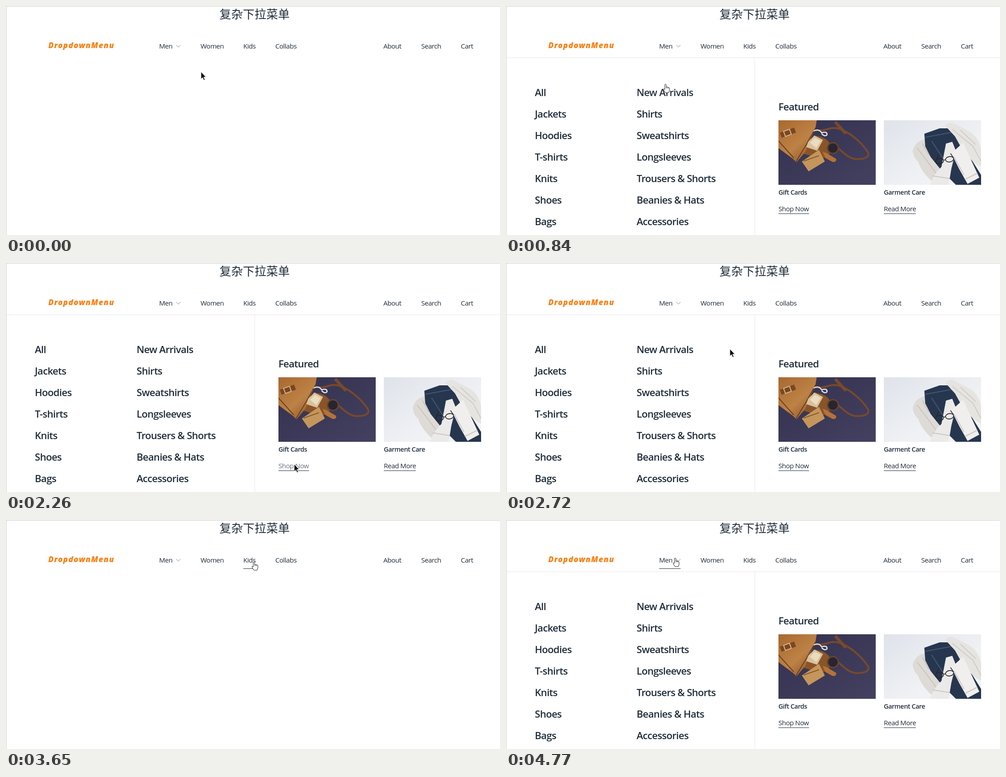
An HTML page for the animation above (4830 ms loop, 1097x511 px).

```html
<!DOCTYPE html>
<html lang="en">
<head>
<meta charset="utf-8">
<title>Dropdown menu</title>
<style>
  html, body { margin: 0; width: 100%; height: 100%; overflow: hidden; background: #fff; }
  svg { display: block; }
  text { font-family: "Open Sans", "Noto Sans", sans-serif; fill: #1f2d3a; white-space: pre; }
  .title { font: 26px "Noto Sans CJK SC", "Noto Sans CJK", sans-serif; }
  .brand { font-size: 17px; font-style: italic; font-weight: 800; letter-spacing: 1.35px; fill: #fb7f12; }
  .nav, .link { font-size: 15px; letter-spacing: -.5px; }
  .big { font-size: 22px; font-weight: 600; letter-spacing: -.7px; }
  .caption { font-size: 14.4px; font-weight: 600; letter-spacing: -.48px; }
  .rule { fill: #e5e7eb; }
  .line { fill: #1f2d3a; }
  #arrow { fill: #111; stroke: #fff; stroke-width: .8; }
  #hand { fill: #fff; stroke: #222; stroke-linejoin: round; }
</style>
</head>
<body>
<svg width="1097" height="511" viewBox="0 0 1097 511">
  <defs>
    <linearGradient id="navy" x2="1" y2="1">
      <stop stop-color="#33314f"/><stop offset="1" stop-color="#43415f"/>
    </linearGradient>
    <linearGradient id="leather" x2=".8" y2="1">
      <stop stop-color="#a8682f"/><stop offset=".6" stop-color="#bd8246"/><stop offset="1" stop-color="#8d5628"/>
    </linearGradient>
    <linearGradient id="pale" x2="1" y2="1">
      <stop stop-color="#dfe3ea"/><stop offset=".6" stop-color="#eff1f4"/><stop offset="1" stop-color="#f5f5f6"/>
    </linearGradient>
    <clipPath id="crop"><path d="M0 0H216V144H0Z"/></clipPath>
  </defs>

  <text class="title" x="474" y="28">复杂下拉菜单</text>
  <text class="brand" x="94" y="94">DropdownMenu</text>
  <g id="nav"></g>
  <path d="M378 87l4.7 5 4.7-5" fill="none" stroke="#7d858d"/>

  <g id="panel">
    <path class="rule" d="M0 115H1097v1H0ZM552 116h1v420h-1Z"/>
    <g id="list"></g>
    <text class="big" x="605" y="233">Featured</text>

    <g transform="translate(605 255)" clip-path="url(#crop)">
      <path fill="url(#navy)" d="M0 0H216V144H0Z"/>
      <g fill="none" stroke="#79492b" stroke-linecap="round">
        <path stroke-width="4" d="M84 22C104 26 112 14 132 18C160 26 186 52 198 70C206 84 186 88 168 86C150 82 140 66 124 56"/>
        <path stroke-width="7" d="M128 6L148 28"/>
      </g>
      <path fill="#8a5429" d="M78 34Q112 36 118 62Q114 84 92 86L54 74Z"/>
      <path fill="url(#leather)" d="M0 0H85L82 18L70 44L60 70L40 94L32 86L0 62Z"/>
      <path fill="none" stroke="#6b3f1f" stroke-width="2" d="M83 16L62 54L38 94M0 46L34 84"/>
      <g transform="rotate(-20 20 28)">
        <path fill="#7a4721" d="M4 22H38V34H4Z"/>
        <path fill="none" stroke="#d9b98a" stroke-width="2" d="M13 22H27V34H13Z"/>
      </g>
      <path fill="none" stroke="#e6e4e8" stroke-width="2.5" d="M78 24Q90 18 96 28Q108 24 108 32Q104 38 96 30"/>
      <path fill="#d8c19b" d="M66 48L80 34L99 44L86 68L62 60Z"/>
      <path fill="#eadcc0" d="M70 50L81 39L94 46L84 62Z"/>
      <circle cx="121" cy="62" r="12" fill="#29242f" stroke="#64452f" stroke-width="3"/>
      <path fill="#c4965c" d="M52 92L90 66L103 92L67 114Z"/>
      <path stroke="#85592f" stroke-width="2" d="M56 91L90 79"/>
      <path fill="#b57237" d="M98 70L108 74L128 86Q130 94 120 93L104 84Z"/>
    </g>

    <g transform="translate(839 255)" clip-path="url(#crop)">
      <path fill="url(#pale)" d="M0 0H216V144H0Z"/>
      <path fill="#dedbd7" d="M64 68Q70 46 92 42L106 76L128 108L152 126L134 144H116Q84 118 76 92Q66 84 64 68Z"/>
      <path fill="none" stroke="#c7c3be" stroke-width="2" d="M74 62L94 88L122 126M86 52L100 78"/>
      <path fill="#27364f" d="M90 30L124 18L154 18L168 34L190 80L216 122V144H160L128 112L104 82L92 58Z"/>
      <path fill="none" stroke="#465872" stroke-width="2" d="M92 38L156 26M106 46L136 92"/>
      <path fill="#e6e4e1" d="M136 12Q146 2 158 8L192 26Q212 40 216 66V104L200 94L178 72L158 36Z"/>
      <path fill="none" stroke="#cfccc8" stroke-width="2" d="M152 20L198 58L216 92M170 22L204 54"/>
      <path fill="#ebeae8" d="M138 52L152 48L160 68L150 108L144 144H102Q112 118 128 104Z"/>
      <path fill="#f0efed" d="M150 74L176 50L188 76L212 128L186 142L168 110Z"/>
      <path fill="none" stroke="#cac7c3" stroke-width="2" d="M180 132L208 118M108 124L146 130M156 82L178 122"/>
      <g fill="none" stroke="#26262b" stroke-width="1.6">
        <ellipse cx="124" cy="91" rx="9" ry="6" transform="rotate(-10 124 91)"/>
        <ellipse cx="146" cy="87" rx="9" ry="6" transform="rotate(-10 146 87)"/>
        <path d="M133 89L137 88M115 91L122 76M155 84L148 74"/>
      </g>
    </g>

    <text class="caption" x="605" y="421">Gift Cards</text>
    <text class="caption" x="839" y="421">Garment Care</text>
    <text class="link" id="shop" x="605" y="458">Shop Now</text>
    <text class="link" x="839" y="458">Read More</text>
    <path class="line" d="M605 463h68v1h-68ZM839 463h71v1h-71Z"/>
  </g>

  <g id="lines"></g>
  <path d="M0 0H1097V1H1V511H0Z" fill="#c9c9c9"/>

  <g id="cursor">
    <path id="arrow" d="M0 0V16L3.7 12.6L6.3 18.6L8.8 17.5L6.2 11.7H11Z"/>
    <g id="hand">
      <path d="M-2 2Q-.5-1 1 2V7L6.5 8.2Q8.6 9 8.5 11.5L8 16L6.5 20H-.5L-4.5 14Q-5.2 11-3.4 11.3L-2 13Z"/>
      <path d="M1 7V10.5M3.6 7.8V10.5M6.1 8.4V11" stroke-width=".8"/>
    </g>
  </g>
</svg>

<script>
const LOOP = 4830, FIRST = 60, STEP = 78;
const INK = [31, 45, 58], SOFT = [75, 85, 99], GREY = [107, 114, 128];
const $ = id => document.getElementById(id);

function add(parent, tag, attrs, label = "") {
  const el = document.createElementNS("http://www.w3.org/2000/svg", tag);
  for (const key in attrs) el.setAttribute(key, attrs[key]);
  el.textContent = label;
  return parent.appendChild(el);
}

// The hover area of a text, grown to the right and up and down
function area(el, right = 0, pad = 0) {
  const { x, y, width, height } = el.getBBox();
  return { el, x, y: y - pad, width: width + right, height: height + 2 * pad };
}

const CHEVRON = 18;
const places = { Men: 340, Women: 432, Kids: 527, Collabs: 598, About: 838, Search: 922, Cart: 1010 };
const tabs = Object.entries(places).map(([name, x]) => {
  const tab = area(add($("nav"), "text", { class: "nav", x, y: 95 }, name), name === "Men" ? CHEVRON : 0);
  tab.line = add($("lines"), "rect", { class: "line", y: 108, height: 1 });
  return tab;
});

const columns = [
  [64, "All,Jackets,Hoodies,T-shirts,Knits,Shoes,Bags"],
  [290, "New Arrivals,Shirts,Sweatshirts,Longsleeves,Trousers & Shorts,Beanies & Hats,Accessories"]
];
const items = columns.flatMap(([x, names]) => names.split(",").map((name, i) =>
  area(add($("list"), "text", { class: "big", x, y: 201 + 48 * i }, name), 0, 9)));
const shop = area($("shop"));

// Stops of the pointer: ms, x, y
const stops = [
  [0, 433, 147], [216, 363, 88], [606, 362, 86], [1152, 345, 290], [1308, 338, 374],
  [1464, 420, 413], [1698, 574, 421], [2244, 640, 449], [2322, 640, 449], [2868, 440, 89],
  [3250, 440, 89], [3560, 551, 92], [3804, 551, 92], [4350, 398, 87], [4600, 376, 84], [LOOP, 376, 84]
];

function pointer(t) {
  const i = Math.max(1, stops.findIndex(stop => stop[0] > t));
  const [t0, x0, y0] = stops[i - 1], [t1, x1, y1] = stops[i];
  const k = Math.max(0, (t - t0) / (t1 - t0));
  return [x0 + (x1 - x0) * k, y0 + (y1 - y0) * k];
}

const inside = (a, [x, y]) => x >= a.x && x < a.x + a.width && y >= a.y && y < a.y + a.height;

// A hover fades with the share of the last moments spent over the area
function hover(a, t, span) {
  const n = 20;
  let hits = 0;
  for (let i = 0; i < n; i++) hits += inside(a, pointer(t - span * i / n));
  return hits / n;
}

const easeOut = k => 1 - (1 - Math.min(1, Math.max(0, k))) ** 3;
const mix = (a, b, k) => `rgb(${a.map((v, i) => Math.round(v + (b[i] - v) * k))})`;

function draw(t) {
  const at = pointer(t);
  const onLink = [...tabs, ...items].some(a => inside(a, at));
  $("cursor").setAttribute("transform", `translate(${at})`);
  $("hand").style.display = onLink ? "" : "none";
  $("arrow").style.display = onLink ? "none" : "";

  const since = start => easeOut((t - start) / 220);
  const shown = since(60) - since(2790) + since(4430);
  $("panel").setAttribute("opacity", shown);
  $("panel").setAttribute("transform", `translate(0 ${18 * (1 - shown)})`);

  for (const item of items) item.el.style.fill = mix(INK, SOFT, hover(item, t, 130));
  shop.el.style.fill = mix(INK, GREY, hover(shop, t, 130));

  for (const tab of tabs) {
    const width = tab.width * hover(tab, t, 150);
    tab.line.setAttribute("x", tab.x + tab.width - width);
    tab.line.setAttribute("width", width);
  }
}

// The picture advances in even steps
function tick() {
  const t = performance.now() % LOOP;
  draw(t < FIRST ? 0 : FIRST + Math.floor((t - FIRST) / STEP) * STEP);
  requestAnimationFrame(tick);
}
tick();
</script>
</body>
</html>
```
